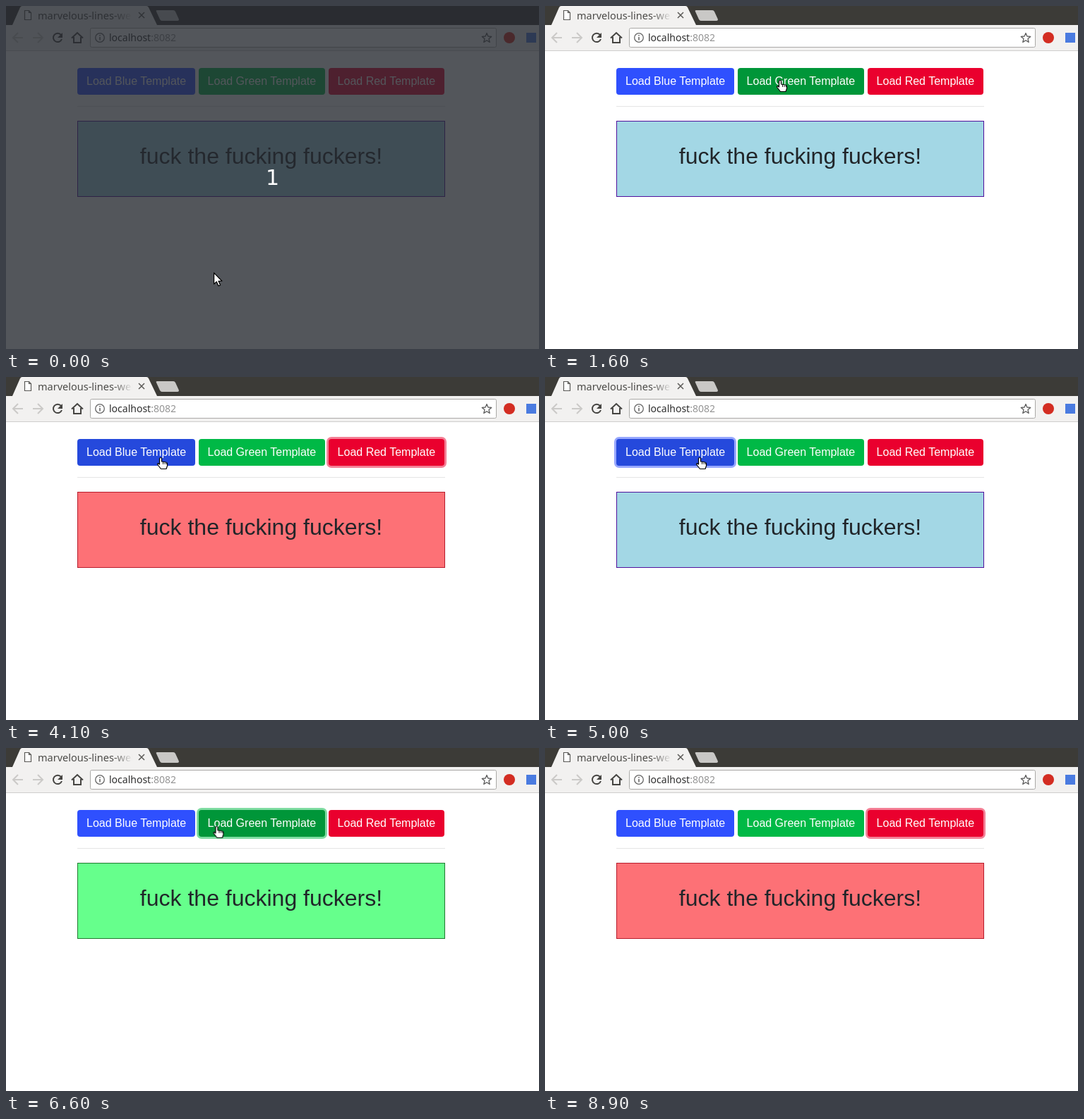
These frames come from a looping animation (755 by 487 pixels, 9300 ms). An HTML page:

```html
<!DOCTYPE html>
<html lang="en">
<head>
<meta charset="utf-8">
<title>Template buttons</title>
<style>
  html, body { margin: 0; width: 100%; height: 100%; overflow: hidden; background: #fff; }
  #stage { position: relative; width: 755px; height: 487px; overflow: hidden; background: #fff;
    font-family: "Liberation Sans", Arial, sans-serif; }
  #stage > * { position: absolute; }

  /* every track shares one 9.3 s loop; 100 ms = 1.0753% */
  .btn, .panel, .shade, .cursor, .arrow, .hand { animation: 9.3s step-end infinite; }

  .chrome { left: 0; top: 0; }
  .chrome text { font: 14px "Noto Sans", "Open Sans", sans-serif; }
  .title { left: 45px; top: 3px; width: 134px; height: 20px; overflow: hidden; white-space: nowrap;
    font: 14.5px/20px "Noto Sans", "Open Sans", sans-serif; color: #4c4b48;
    -webkit-mask-image: linear-gradient(90deg, #000 80%, transparent);
    mask-image: linear-gradient(90deg, #000 80%, transparent); }

  .bar { left: 101px; top: 88px; display: flex; gap: 4.45px; }
  .btn { height: 38px; padding: 0 13px; border-radius: 4px; font-size: 16px; line-height: 37px;
    color: #fff; white-space: nowrap; background: var(--base); }
  .blue { --base: #2f50fe; --over: #2549dc; --ring: 0 0 0 3px #97a7fe; animation-name: blue-over, blue-ring; }
  .green { --base: #00b946; --over: #009639; --ring: 0 0 0 3px #80dca2; animation-name: green-over, green-ring; }
  .red { --base: #ea002e; --over: #d00020; --ring: 0 0 0 3px #f48096; animation-name: red-over, red-ring; }

  hr { left: 101px; top: 142px; width: 521px; height: 1px; margin: 0; border: 0; background: #e5e5e5; }
  .panel { left: 101px; top: 163px; width: 521px; height: 108px; box-sizing: border-box;
    border: 1px solid; animation-name: panel; }
  .quote { left: 101px; top: 194px; width: 521px; text-align: center; color: #212529;
    font-size: 32px; line-height: 38px; }

  .shade { inset: 0; background: rgba(37, 41, 48, .79); animation-name: shade; }
  .count { position: absolute; left: 0; right: 0; top: 226px; text-align: center; color: #fff;
    font: 30px/35px "DejaVu Sans", sans-serif; }

  .cursor { left: 0; top: 0; overflow: visible; animation-name: move, leave; }
  .cursor path { fill: #fff; stroke: #000; stroke-linejoin: round; }
  .arrow { animation-name: arrow; }
  .hand { animation-name: hand; }

  @keyframes shade { 0% { visibility: visible } 6.451%, 100% { visibility: hidden } }
  @keyframes leave { 0% { visibility: visible } 95.698%, 100% { visibility: hidden } }
  @keyframes arrow { 0%, 90.322%, 100% { opacity: 1 } 16.129% { opacity: 0 } }
  @keyframes hand { 0%, 90.322%, 100% { opacity: 0 } 16.129% { opacity: 1 } }

  @keyframes move {
    0% { transform: translate(294px, 378px) }
    5.376% { transform: translate(294px, 378px); animation-timing-function: steps(10) }
    16.129% { transform: translate(250px, 109px) }
    17.204% { transform: translate(333px, 105px) }
    22.580% { transform: translate(333px, 105px); animation-timing-function: steps(2) }
    24.731% { transform: translate(271px, 117px); animation-timing-function: steps(4) }
    29.032% { transform: translate(502px, 109px) }
    36.559% { transform: translate(502px, 109px); animation-timing-function: steps(7) }
    44.086% { transform: translate(219px, 114px) }
    56.989% { transform: translate(448px, 113px) }
    58.064% { transform: translate(438px, 112px) }
    62.365% { transform: translate(340px, 110px) }
    64.516% { transform: translate(344px, 110px) }
    68.817% { transform: translate(344px, 110px); animation-timing-function: steps(5) }
    74.193% { transform: translate(230px, 112px) }
    77.419% { transform: translate(405px, 110px); animation-timing-function: steps(3) }
    80.645% { transform: translate(520px, 111px) }
    89.247% { transform: translate(520px, 111px); animation-timing-function: steps(4) }
    93.548%, 100% { transform: translate(139px, 1px) }
  }

  @keyframes blue-over {
    0%, 17.204%, 56.989%, 77.419%, 100% { background: var(--base) }
    16.129%, 43.010%, 73.118% { background: var(--over) }
  }
  @keyframes green-over {
    0%, 29.032%, 43.010%, 73.118%, 79.569%, 100% { background: var(--base) }
    17.204%, 38.709%, 56.989%, 77.419% { background: var(--over) }
  }
  @keyframes red-over {
    0%, 38.709%, 90.322%, 100% { background: var(--base) }
    29.032%, 79.569% { background: var(--over) }
  }

  @keyframes blue-ring {
    0%, 64.516%, 87.096%, 100% { box-shadow: none }
    51.612%, 75.268% { box-shadow: var(--ring) }
  }
  @keyframes green-ring {
    0%, 35.483%, 75.268%, 100% { box-shadow: none }
    19.354%, 66.666% { box-shadow: var(--ring) }
  }
  @keyframes red-ring {
    0%, 51.612% { box-shadow: none }
    35.483%, 87.096%, 100% { box-shadow: var(--ring) }
  }

  @keyframes panel {
    0%, 52.688%, 76.344% { background: #a3d7e5; border-color: #50109c }
    20.430%, 67.741% { background: #66ff8c; border-color: #207a30 }
    36.559%, 87.096%, 100% { background: #fd7176; border-color: #b71c2c }
  }
</style>
</head>
<body>
<div id="stage">
  <svg class="chrome" width="755" height="64" fill="none">
    <path fill="#3c3b37" d="M0 0h755v27H0z"/>
    <path fill="#f2f1f0" d="M0 27h9L20 2q1-2 3-2h176q2 0 3 2l12 25h541v36H0z"/>
    <path fill="#cfcecc" d="M0 63h755v1H0z"/>
    <path fill="#c9c8c6" d="M214 6h23q2 0 3 2l5 11q0 2-2 2h-22q-2 0-3-2l-5-11q-1-2 1-2z"/>
    <path stroke="#5a5956" stroke-width="1.2" fill="#fff" d="M26.5 6.5h6l3 3v10h-9zM32.5 6.5v3h3"/>
    <path stroke="#5a5956" stroke-width="1.5" d="M188 9l8 8m0-8l-8 8"/>
    <g stroke="#cbcac8" stroke-width="2">
      <path d="M24 45H10m7-7l-7 7 7 7"/>
      <path d="M38 45h14m-7-7l7 7-7 7"/>
    </g>
    <g stroke="#454441" stroke-width="2">
      <path d="M78 41a6.2 6.2 0 1 0 1 6"/>
      <path fill="#454441" stroke="none" d="M80 38v7h-7z"/>
      <path d="M93 45.500l8-7.500 8 7.500M96 44v8h10v-8"/>
    </g>
    <rect x="119.500" y="31.500" width="575" height="27" rx="2" fill="#fff" stroke="#aaa9a7"/>
    <circle cx="133" cy="45" r="6.300" stroke="#666" stroke-width="1.300"/>
    <path stroke="#666" stroke-width="1.600" d="M133 44v4.500m0-7.500v1.600"/>
    <text x="146" y="50" fill="#2d2d2d">localhost<tspan fill="#949494">:8082</tspan></text>
    <path stroke="#5c5c5c" stroke-width="1.300" stroke-linejoin="round"
      d="M681 38.500l1.900 4.500 4.800.4-3.700 3.200 1.200 4.800-4.200-2.600-4.200 2.600 1.200-4.800-3.700-3.200 4.800-.4z"/>
    <circle cx="713" cy="45" r="8" fill="#d32d22"/>
    <path fill="#4a7be0" d="M737 38h14v14h-14z"/>
  </svg>
  <div class="title">marvelous-lines-web</div>

  <div class="bar">
    <div class="btn blue">Load Blue Template</div>
    <div class="btn green">Load Green Template</div>
    <div class="btn red">Load Red Template</div>
  </div>
  <hr>
  <div class="panel"></div>
  <div class="quote">fuck the fucking fuckers!</div>

  <div class="shade"><div class="count">1</div></div>

  <svg class="cursor" width="18" height="22">
    <path class="arrow" stroke-width="1.200" d="M.6.8v16l3.700-3.400 2.700 6 2.600-1.200-2.600-5.700h4.900z"/>
    <g class="hand">
      <path stroke-width="1.200" d="M-1.500 10V2a1.500 1.500 0 0 1 3 0v4l6 1q2 .4 2 2.200v3l-1.500 4.300H.5l-4.300-5.500q-1.300-2 .3-2.400z"/>
      <path stroke-width=".9" d="M3.500 7v3m2.500-2.600v2.600m2.300-2.200v2.200"/>
    </g>
  </svg>
</div>
</body>
</html>
```
